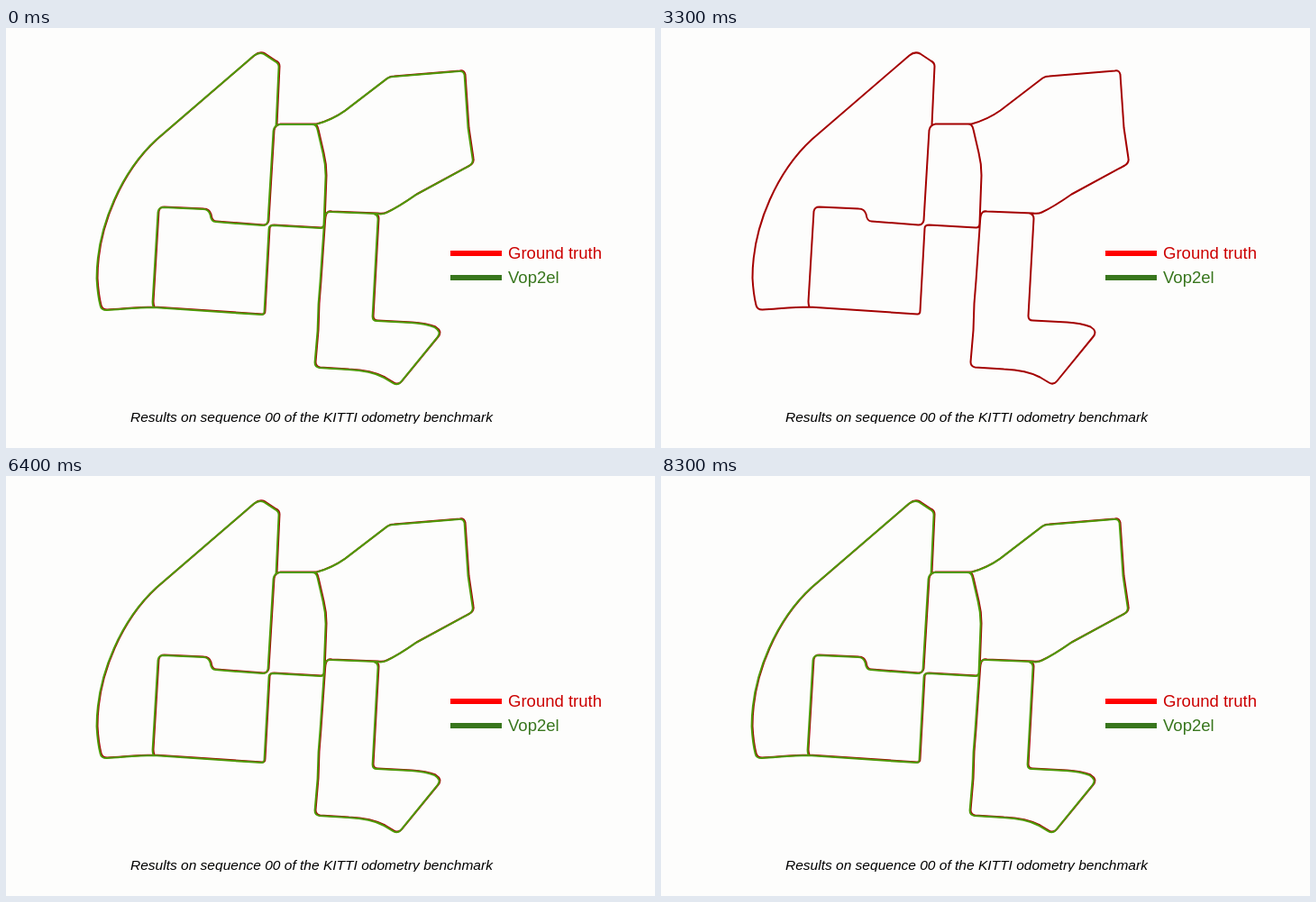
An HTML page that plays this animation: 720 by 466 pixels, repeating every 8400 ms.

```html
<!DOCTYPE html>
<html lang="en">
<head>
<meta charset="utf-8">
<title>Odometry comparison</title>
<style>
  html, body { margin: 0; width: 100%; height: 100%; overflow: hidden; background: #fdfdfc; }
  svg { display: block; width: 720px; height: 466px; font-family: "Liberation Sans", Arial, sans-serif; }
  .track { fill: none; stroke-width: 2; stroke-linejoin: round; stroke-linecap: round; }
  .legend { font-size: 18.55px; }
  .caption { font-size: 15.52px; font-style: italic; }
</style>
</head>
<body>
<svg viewBox="0 0 720 466">
  <defs>
    <path id="route" d="
      M300 107 L303 42 Q303 38 299 36 L287 28 Q281 25 275 30 L167 123
      C130 157 101 217 101 277 Q102 295 105 307 Q106 312 112 312 C130 311 145 309 164 309
      L284 317 Q287 317 287 313 L292 222 Q292 218 297 218 L349 221 Q353 221 353 216
      L355 163 Q355 150 352 138 L346 112 Q345 106 340 106
      M164 309 Q163 306 163 303 L169 203 Q170 198 175 198 L219 200 Q225 200 227 206
      Q228 214 233 214 L285 218 Q290 218 291 213 L297 113 Q298 107 304 106 L344 106
      Q362 101 376 91 L423 55 Q426 53 430 53 L503 47 Q508 46 509 51 L513 110 L518 144
      Q519 149 514 152 L455 184 Q435 198 422 204 Q418 206 412 205 L361 203 Q355 202 354 209 L353 218
      M354 207 L349 280 L347 305 L346 335 L343 370 Q343 375 348 376 L380 378 Q405 379 420 387 L430 393
      Q435 396 439 391 L479 342 Q484 336 476 331 Q466 327 450 326 L412 324
      Q407 324 407 319 L413 211 Q413 206 408 205"/>
    <clipPath id="captionBox"><rect x="130" y="415" width="420" height="24"/></clipPath>
  </defs>
  <g transform="translate(.5 .5)">
    <use href="#route" class="track" stroke="#a40000"/>
    <use href="#route" class="track" stroke="#4e9a06" id="estimate" transform="translate(-.9 .6)"/>
  </g>
  <g class="legend">
    <rect x="493" y="247" width="57" height="6" fill="#f00"/>
    <text x="557" y="256" fill="#c00">Ground truth</text>
    <rect x="493" y="274" width="57" height="6" fill="#38761d"/>
    <text x="557" y="283" fill="#38761d">Vop2el</text>
  </g>
  <g clip-path="url(#captionBox)">
    <text class="caption" x="138" y="436.5">Results on sequence 00 of the KITTI odometry benchmark</text>
  </g>
</svg>
<script>
  const LOOP = 8400, HIDE_AT = 3000, SHOW_AT = 6000;
  const estimate = document.getElementById("estimate");

  function draw(now) {
    const t = now % LOOP;
    const hidden = t >= HIDE_AT && t < SHOW_AT;
    estimate.setAttribute("visibility", hidden ? "hidden" : "visible");
    requestAnimationFrame(draw);
  }
  draw(performance.now());
</script>
</body>
</html>
```
